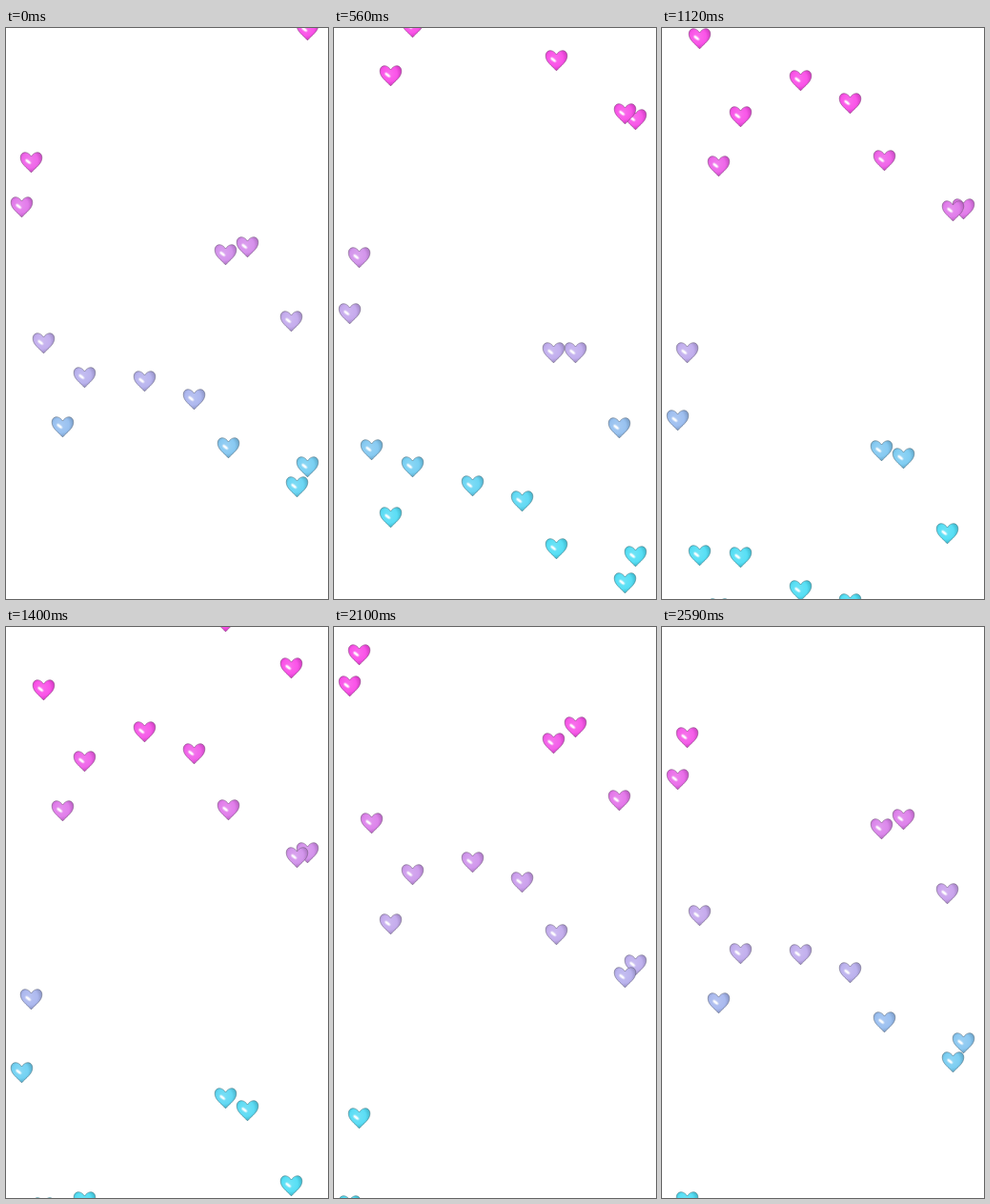
Write an HTML page with a canvas that moves like this. It is 338 px wide and 600 px high and loops after 2660 ms.

```html
<!DOCTYPE html>
<html lang="en">
<head>
<meta charset="utf-8">
<title>Falling hearts</title>
<style>
html, body { margin: 0; width: 100%; height: 100%; overflow: hidden; background: #fff; }
canvas { display: block; }
</style>
</head>
<body>
<canvas width="338" height="600"></canvas>
<script>
const ctx = document.querySelector('canvas').getContext('2d');
const STEP = 70, STEPS = 38, CYCLE = 39;
const PINK = [250, 68, 230], LILAC = [190, 168, 236], CYAN = [72, 220, 244];

// Each heart: column, height at the loop start, fall per step
const hearts = [
  [26.5, 141, 12.5], [16.5, 188, 14], [253.5, 229.7, 13.89], [230.5, 238, 12.85],
  [299.5, 308, 13.95], [39.5, 331.3, 13.94], [82.5, 366.5, 11.87], [145.5, 371, 13.74],
  [197.5, 389.5, 13.49], [59.5, 419, 11.91], [233.5, 441.45, 13.15],
  [316.5, 461, 11.77], [305.5, 482, 12.63]
];

const half = s => `C${s * 1.3}-8 ${s * 3.6}-10.3 ${s * 6.4}-10.3` +
  `C${s * 9.6}-10.3 ${s * 11.3}-7.8 ${s * 11.3}-4.8` +
  `C${s * 11.3} 1.8 ${s * 4.6} 5.6 0 10.9`;
const shape = new Path2D(`M0-6${half(-1)}M0-6${half(1)}`);

const mix = (a, b, p) => a.map((c, i) => c + (b[i] - c) * p);
const shade = (rgb, level, p) => `rgb(${mix(rgb, [level, level, level], p).map(Math.round)})`;

function ease(from, to, y) {
  const p = Math.min(Math.max((y - from) / (to - from), 0), 1);
  return p * p * (3 - 2 * p);
}

const tintAt = y => mix(mix(PINK, LILAC, ease(60, 340, y)), CYAN, ease(330, 540, y));

function glow(rx, ry, alpha) {
  ctx.fillStyle = `rgba(255,255,255,${alpha})`;
  ctx.beginPath();
  ctx.ellipse(-3.3, -0.6, rx, ry, 0.65, 0, Math.PI * 2);
  ctx.fill();
}

function drawHeart(x, y) {
  const rgb = tintAt(y);
  const body = ctx.createRadialGradient(-2, -2, 1, -1, -2, 13);
  body.addColorStop(0, shade(rgb, 255, 0.2));
  body.addColorStop(0.6, shade(rgb, 255, 0.08));
  body.addColorStop(1, shade(rgb, 0, 0.18));
  ctx.save();
  ctx.translate(x, y);
  ctx.fillStyle = body;
  ctx.fill(shape);
  ctx.strokeStyle = shade(rgb, 60, 0.6);
  ctx.lineWidth = 0.6;
  ctx.stroke(shape);
  glow(4, 2.1, 0.35);
  glow(3, 1.2, 0.9);
  ctx.restore();
}

const start = performance.now();

function frame() {
  const k = Math.floor((performance.now() - start) / STEP) % STEPS;
  ctx.clearRect(0, 0, 338, 600);
  for (const [x, y, fall] of hearts) {
    const low = y + fall * k;
    drawHeart(x, Math.round(low));
    drawHeart(x, Math.round(low - fall * CYCLE));
  }
  requestAnimationFrame(frame);
}
frame();
</script>
</body>
</html>
```
